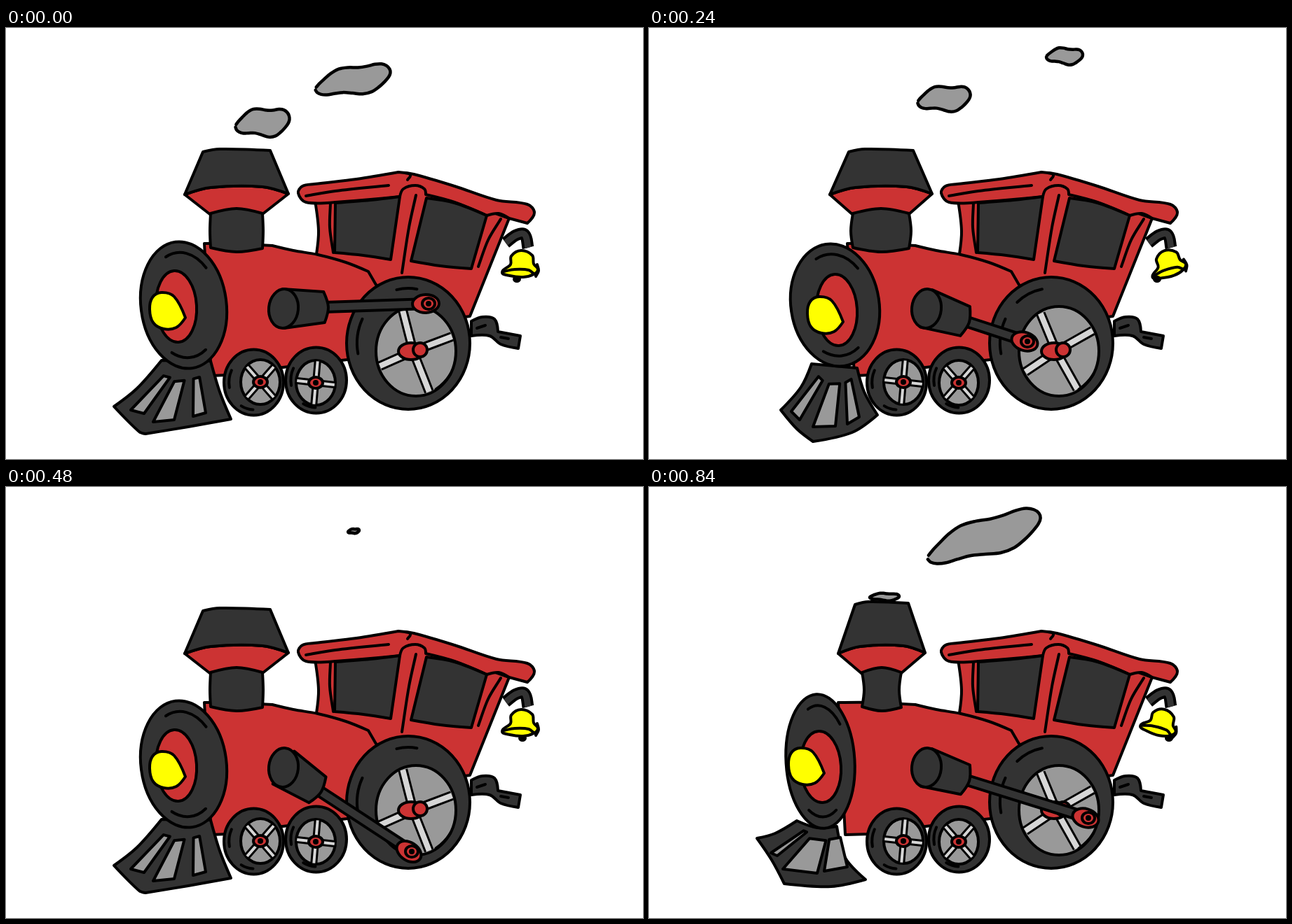
Write an HTML page with a canvas that moves like this. It is 909x616 px and loops after 960 ms.

```html
<!DOCTYPE html>
<html lang="en">
<meta charset="utf-8">
<title>Steam train</title>
<style>
html, body { margin: 0; width: 100%; height: 100%; overflow: hidden; background: #fff }
canvas { display: block }
</style>
<canvas width="909" height="616"></canvas>
<script>
const ctx = document.querySelector('canvas').getContext('2d');
const RED = '#cc3333', DARK = '#333333', GREY = '#999999', LIGHT = '#d6d6d6', YELLOW = '#ffff00';
const LOOP = 960, POSE_TIME = 240, TURN = Math.PI * 2;

// Points are "x,y"; a trailing "!" marks a sharp corner.
const parse = s => s.split(' ').map(token => {
  const [x, y] = token.split(',').map(parseFloat);
  return { x, y, corner: token.endsWith('!') };
});

function curve(points, closed) {
  const path = new Path2D(), n = points.length;
  const at = i => closed ? points[(i + n) % n] : points[Math.max(0, Math.min(n - 1, i))];
  const handle = (i, j) => {
    const a = at(i), b = at(j), dx = at(i + 1).x - at(i - 1).x, dy = at(i + 1).y - at(i - 1).y;
    const k = a.corner ? 0 : (j - i) * Math.hypot(b.x - a.x, b.y - a.y) / (3 * Math.hypot(dx, dy) || 1);
    return [a.x + dx * k, a.y + dy * k];
  };
  path.moveTo(points[0].x, points[0].y);
  for (let i = 0; i < n - !closed; i++)
    path.bezierCurveTo(...handle(i, i + 1), ...handle(i + 1, i), at(i + 1).x, at(i + 1).y);
  if (closed) path.closePath();
  return path;
}

function strokePath(path, width = 4, color = '#000') {
  ctx.lineWidth = width;
  ctx.strokeStyle = color;
  ctx.stroke(path);
}
function paint(path, color) {
  ctx.fillStyle = color;
  ctx.fill(path);
  strokePath(path);
}
const shape = (s, color) => paint(curve(parse(s), true), color);
const line = (s, width, color) => strokePath(curve(parse(s)), width, color);

// A coloured strip with a black edge on both sides.
function strip(s, width, color, edge = 4) {
  ctx.lineCap = 'butt';
  line(s, width + edge * 2);
  line(s, width, color);
  ctx.lineCap = 'round';
}

// Ellipses are [x, y, rx, ry, tilt].
function arcPath([x, y, rx, ry, tilt = 0], scale, from, to) {
  const path = new Path2D();
  path.ellipse(x, y, rx * scale, ry * scale, tilt, from, to);
  return path;
}
const oval = (ellipse, color) => paint(arcPath(ellipse, 1, 0, TURN), color);
const shine = (ellipse, from, to) => strokePath(arcPath(ellipse, 0.83, from, to));

function placed(x, y, angle, draw) {
  ctx.save();
  ctx.translate(x, y);
  ctx.rotate(angle);
  draw();
  ctx.restore();
}

// stack: x, top y, half widths of top, brim and neck, neck bulge
const upright = {
  stack: [329, 175, 48, 74, 37, 1],
  ring: [253.5, 396, 61, 91, -0.13], face: [243, 398], lamp: [230, 404],
  plow: '154,541! 187,515 222,475! 292,476! 305,520 321,559! 260,570 199,580! 190,577',
  bars: '178,546 197,551 210,563 240,560 267,555 285,550', apex: [268, 452],
  boilerLeft: 283, bellTilt: 0, spokes: -0.35, turned: false
};
const poses = [
  { ...upright, pin: [603, 394], clapper: 729 },
  {
    stack: [331, 175, 46, 73, 40, 3],
    ring: [265.5, 396, 63, 88, -0.15], face: [268, 403], lamp: [251, 410],
    plow: '188,546! 217,513 232,480! 297,486! 307,520 326,553! 290,578 234,591! 211,573',
    bars: '203,548 215,560 234,570 266,569 283,566 300,556', apex: [278, 452],
    boilerLeft: 283, bellTilt: -0.3, spokes: -0.5, turned: true, pin: [540, 448], clapper: 725
  },
  { ...upright, pin: [579, 521], clapper: 737 },
  {
    stack: [332, 166, 38, 62, 28, -3],
    ring: [244.5, 392, 49, 96, -0.06], face: [245, 400], lamp: [224, 399],
    plow: '154,502! 180,495 211,477! 240,487 268,485! 280,530 309,561! 260,571 193,567! 175,533',
    bars: '174,523 183,527 191,546 240,552 250,549 283,543', apex: [264, 462],
    boilerLeft: 270, bellTilt: 0.25, spokes: -0.5, turned: true, pin: [627, 473], clapper: 742
  }
];

function drawBell(tilt, clapper) {
  strip('713,307 728,296 740,295 745,314', 9, DARK);
  placed(736, 318, tilt, () => {
    shape('-28,31 -16,20 -15,8 -1,0 15,7 17,19 23,27 17,34 2,38 -17,36', YELLOW);
    line('-26,30 -10,27 10,28 18,34');
    line('22,20 24,29 20,37');
  });
  oval([clapper, 359, 4, 3], '#000');
}

function drawCab() {
  shape('664,419! 680,413 697,416 702,434! 734,440! 731,458! 706,452 690,440 664,440!', DARK);
  line('672,429 684,425');
  line('706,442 717,444');
  shape('443,323! 446,290 441,247! 580,222! 718,272! 662,412! 600,420! 528,367!', RED);
  shape('417,236 423,226 440,223 500,216 560,206! 582,209 640,226 700,246 744,252 754,264 744,279! 718,272! 703,265 686,268! 640,249 599,238! 597,230 584,225 567,230 562,241! 520,245 470,249! 428,249', RED);
  line('428,240 470,233 546,225');
  line('569,207 577,210 573,217');
  shape('470,250! 520,246 562,241! 549,331! 510,325 469,321!', DARK);
  shape('600,243! 640,250 686,268! 664,344! 620,340 578,333!', DARK);
  line('463,250 462,285 467,321');
  line('585,239 575,285 565,350');
  line('706,273 688,303 674,341');
}

function drawStack([x, y, top, brim, neck, bulge]) {
  const brimLine = `${x + brim},237! ${x + brim / 2},227 ${x - brim / 2},228 ${x - brim},238!`;
  shape(`${brimLine} ${x - neck},267! ${x},259 ${x + neck},266!`, RED);
  shape(`${x - neck},265! ${x},258 ${x + neck},265! ${x + neck + bulge},290 ${x + neck},315! ${x},320 ${x - neck},314! ${x - neck - bulge},290`, DARK);
  shape(`${x - top},${y + 2}! ${x - top / 2},${y - 2} ${x + top},${y}! ${brimLine}`, DARK);
}

function drawPlow({ plow, bars, apex }) {
  shape(plow, DARK);
  const feet = parse(bars);
  const toward = p => `${p.x + (apex[0] - p.x) * 0.52},${p.y + (apex[1] - p.y) * 0.52}!`;
  for (let i = 0; i < feet.length; i += 2) {
    const [a, b] = feet.slice(i, i + 2);
    shape(`${a.x},${a.y}! ${toward(a)} ${toward(b)} ${b.x},${b.y}!`, GREY);
  }
}

function drawBoiler(pose) {
  const left = pose.boilerLeft;
  shape(`${left},308! 320,308 380,311! 410,318 445,324 485,335 517,348! 528,367! 560,420! 487,474! 395,485 315,496! ${left + 10},497!`, RED);
  drawStack(pose.stack);
  drawPlow(pose);
  oval(pose.ring, DARK);
  shine(pose.ring, -1.9, -0.7);
  shine(pose.ring, 1.1, 2.1);
  oval([...pose.face, 29, 51, -0.06], RED);
  placed(...pose.lamp, 0, () => shape('-25,-2 -21,-19 -8,-26 10,-20 26,10! 13,24 -5,26 -20,17', YELLOW));
}

function drawWheel(tire, rim, hub, phase, width) {
  const [x, y, rx, ry] = rim;
  oval(tire, DARK);
  oval(rim, GREY);
  for (let i = 0; i < 4; i++) {
    const angle = phase + i * TURN / 4;
    const endX = x + rx * 0.96 * Math.cos(angle), endY = y + ry * 0.96 * Math.sin(angle);
    strip(`${hub[0]},${hub[1]} ${endX},${endY}`, width, LIGHT, 3);
  }
  shine(tire, 2.95, 3.6);
}

function drawWheels({ turned, spokes }) {
  const plus = 0.1, cross = TURN / 8;
  const small = (tire, hub, phase) => {
    drawWheel(tire, [...hub, 28, 32], hub, phase, 4);
    shine(tire, 1.6, 2.1);
    oval([...hub, 10, 8], RED);
    oval([...hub, 2, 2], '#000');
  };
  small([353.5, 506.5, 42.5, 47], [363, 506], turned ? plus : cross);
  small([442.5, 503.5, 43.5, 47], [442, 507], turned ? cross : plus);

  const tire = [574, 450.5, 88, 94.5];
  drawWheel(tire, [585, 462, 57, 64], [581, 462], spokes, 8);
  shine(tire, 0.6, 1);
  shine(tire, turned ? -2.3 : -1.8, turned ? -1.75 : -1.4);
  oval([578, 462, 18, 12], RED);
  oval([591, 460, 10, 10], RED);
}

function drawPiston([x, y]) {
  const start = [396, 401], angle = Math.atan2(y - start[1], x - start[0]);
  const reach = Math.hypot(x - start[0], y - start[1]);
  placed(...start, angle, () => {
    strip(`58,0 ${reach - 14},0`, 10, DARK);
    shape('0,-28! 58,-22! 64,0 58,22! 0,28!', DARK);
  });
  oval([...start, 21, 28, 0.1], DARK);
  oval([x - 4, y, 19, 13, angle], RED);
  oval([x, y, 9, 8], RED);
  oval([x, y, 2, 2], '#000');
}

// Smoke runs from 540 ms on into the next loop: time, x, y, rx, ry, tilt.
const puffs = [
  [[540, 342, 144, 30, 16, -0.1], [630, 374, 121, 75, 24, -0.35], [720, 400, 108, 82, 19, -0.27], [840, 478, 72, 86, 25, -0.33],
    [960, 495, 75, 55, 19, -0.2], [1140, 593, 40, 26, 11, 0], [1320, 627, 23, 9, 3, 0]],
  [[840, 336, 157, 21, 5, 0], [960, 366, 135, 39, 19, -0.1], [1140, 421, 101, 38, 17, -0.1], [1320, 486, 73, 17, 5, -0.1], [1410, 496, 63, 8, 3, -0.1]]
];
const smokeSteps = [540, 630, 720, 840, 960, 1050, 1140, 1260, 1320, 1410];

function sample(keys, time) {
  const next = keys.findIndex(key => key[0] >= time);
  if (next < 0 || time < keys[0][0]) return null;
  const b = keys[next], a = keys[Math.max(0, next - 1)];
  const k = (time - a[0]) / (b[0] - a[0] || 1);
  return a.map((v, i) => v + (b[i] - v) * k);
}

function drawPuff([, x, y, rx, ry, tilt]) {
  const points = Array.from({ length: 25 }, (_, i) => {
    const angle = 3.4 + i / 25 * TURN, u = Math.cos(angle);
    return { x: u * rx, y: ry * (Math.sin(angle) * (1 + 0.18 * u) + 0.16 * Math.sin(5 * u)) };
  });
  placed(x, y, tilt, () => {
    ctx.fillStyle = GREY;
    ctx.fill(curve(points, true));
    strokePath(curve(points), 4.5);
  });
}

function drawSmoke(time) {
  const clock = (time + 420) % LOOP + 540;
  const step = smokeSteps.filter(t => t <= clock).pop();
  puffs.map(keys => sample(keys, step)).filter(Boolean).forEach(drawPuff);
}

function frame(now) {
  const time = now % LOOP, pose = poses[Math.floor(time / POSE_TIME)];
  ctx.fillStyle = '#fff';
  ctx.fillRect(0, 0, 909, 616);
  ctx.lineCap = ctx.lineJoin = 'round';
  drawBell(pose.bellTilt, pose.clapper);
  drawCab();
  drawBoiler(pose);
  drawWheels(pose);
  drawPiston(pose.pin);
  drawSmoke(time);
  requestAnimationFrame(frame);
}
requestAnimationFrame(frame);
</script>
</html>
```
